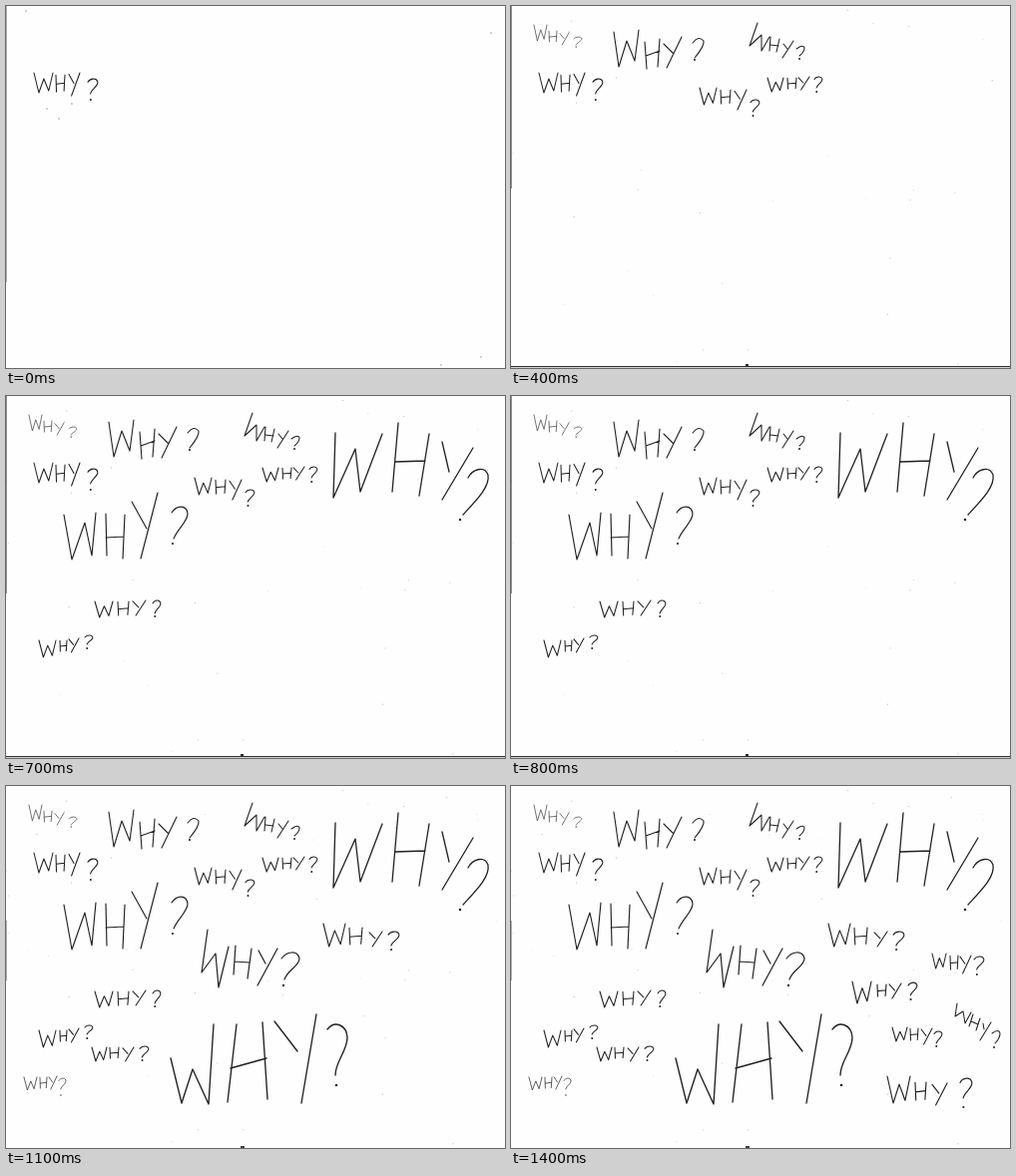
Write an HTML page that moves like this. It is 500 px wide and 363 px high and loops after 1.5 s.

```html
<!DOCTYPE html>
<html lang="en">
<head>
<meta charset="utf-8">
<title>Why?</title>
<style>
html, body { margin: 0; width: 100%; height: 100%; overflow: hidden; background: #fefefe; }
svg { display: block; width: 500px; height: 363px; }
path { fill: none; stroke: #202020; stroke-linecap: round; stroke-linejoin: round; }
</style>
</head>
<body>
<svg id="page" viewBox="0 0 500 363"></svg>
<script>
const STEP = 100, STEPS = 15;
const page = document.getElementById('page');
const parts = [];

// Letters in a unit box, stretched to the place they are written in
const GLYPHS = {
  W: 'M0,0 L.26,1 L.52,.3 L.78,.9 L1,0',
  H: 'M0,.02 L.06,1 M1,0 L.9,.96 M.03,.55 L.95,.48',
  Y: 'M0,.06 L.45,.46 M1,0 L.24,1',
  Q: 'M0,.22 C.2,-.02 .85,-.1 .98,.2 C1.08,.48 .35,.7 .26,1'
};

function add(tag, attrs, from, to = STEPS) {
  const el = document.createElementNS('http://www.w3.org/2000/svg', tag);
  for (const k in attrs) el.setAttribute(k, attrs[k]);
  page.appendChild(el);
  parts.push({ el, from, to });
}

function fit(glyph, [x, y, w, h]) {
  return GLYPHS[glyph].replace(/(-?[\d.]+),(-?[\d.]+)/g,
    (_, u, v) => (x + u * w).toFixed(1) + ',' + (y + v * h).toFixed(1));
}

function ink(from, d, dotX, dotY, width = 1.05, color = '#202020') {
  add('path', { d, style: `stroke:${color};stroke-width:${width}` }, from);
  add('circle', { cx: dotX, cy: dotY, r: width * 0.95, fill: color }, from);
}

// Boxes are [x, y, width, height]; the last number of q is the dot's y
function why(from, w, h, y, q, width, color) {
  const d = [fit('W', w), fit('H', h), fit('Y', y), fit('Q', q)].join(' ');
  ink(from, d, q[0] + q[2] * 0.28, q[4], width, color);
}

why(0, [28, 67, 19, 20], [50, 69, 9, 17], [63, 67, 11, 23], [82, 73, 10, 15, 94]);
why(1, [23, 19, 13, 16], [38, 25, 8, 11], [49, 27, 9, 12], [63, 31, 8, 8, 41], 0.8, '#505050');
ink(2, 'M103,26L108,61L116,35L124,55L128,24M134,36L136,63M149,33L147,61M135,50L149,45' +
  'M153,38L163,48M171,31L156,62M182,37Q188,29 193,35Q194,40 184,52', 184, 54, 1.1);
why(3, [189, 82, 17, 17], [210, 84, 10, 14], [224, 84, 12, 20], [240, 94, 9, 12, 110]);
why(3, [257, 72, 16, 14], [277, 72, 9, 11], [288, 71, 11, 13], [304, 71, 8, 11, 86]);

ink(4, 'M247,17L239,40L251,29L251,45L259,31M260,31L259,45M269,33L266,46M260,39L268,40' +
  'M273,38L277,43M283,35L272,52M286,43Q293,38 294,42Q294,46 289,50', 289, 53);
ink(5, 'M330,37L328,102L350,53L355,96L377,38M393,27L387,96M424,38L414,100M390,66L420,65' +
  'M437,46L444,76M468,52L437,104M463,82C467,74 479,69 483,79C485,91 472,104 458,119', 455, 124, 1.3);
ink(6, 'M58,119L66,164L79,127L86,160L90,117M100,118L101,160M119,119L117,163M100,142L118,141' +
  'M126,106L141,133M152,97L135,163M166,117C171,109 181,109 182,118C182,126 172,133 168,143', 167, 148, 1.15);
why(6, [33, 245, 17, 17], [54, 245, 7, 11], [63, 243, 10, 14], [79, 240, 8, 9, 253]);

why(7, [89, 206, 18, 16], [112, 206, 11, 14], [127, 205, 13, 15], [147, 205, 8, 13, 221]);
why(9, [18, 292, 13, 13], [34, 292, 7, 11], [43, 291, 8, 13], [53, 293, 7, 11, 310], 0.85, '#404040');
why(9, [86, 262, 15, 14], [104, 262, 9, 11], [117, 262, 11, 14], [134, 261, 9, 11, 275]);
ink(10, 'M165,273L176,318L187,284L203,319L208,239M231,239L222,317M257,237L262,314M225,283L261,273' +
  'M269,236L292,266M311,229L296,318M322,244C329,235 341,239 342,252C342,266 330,276 330,290', 331, 300, 1.35);

ink(11, 'M202,144L196,187L210,168L213,202L223,161M230,160L228,189M246,163L242,193M229,176L244,177' +
  'M253,165L260,178M272,163L252,200M276,173C281,166 292,164 294,173C294,181 282,184 279,194', 278, 200, 1.2);
why(11, [318, 138, 22, 23], [344, 142, 13, 17], [364, 146, 13, 15], [383, 146, 11, 14, 164], 1.1);
why(12, [342, 196, 19, 22], [367, 199, 9, 12], [379, 198, 12, 15], [398, 197, 9, 13, 214], 1.15);
why(12, [422, 168, 14, 15], [440, 170, 8, 14], [450, 170, 11, 18], [464, 171, 10, 13, 189]);

why(13, [377, 291, 23, 27], [405, 297, 11, 18], [422, 298, 15, 22], [450, 293, 12, 20, 322], 1.15);
why(13, [382, 242, 15, 14], [400, 243, 8, 12], [411, 243, 11, 16], [424, 246, 8, 12, 261]);
ink(14, 'M447,218L445,231L453,226L455,238L461,227M463,229L459,241M470,233L466,245M461,236L468,239' +
  'M473,238L474,244M481,237L470,255M482,248Q489,243 490,248Q490,253 485,258', 484, 262);

// Scan edges
function edge(x, y, w, h, color, from, to) {
  add('rect', { x, y, width: w, height: h, fill: color }, from, to);
}
edge(0, 0, 1, 277, '#b0b0b0', 0, 1);
edge(0, 0, 1, 165, '#909090', 1, 4);
edge(0, 0, 1, 183, '#909090', 4, 7);
edge(0, 0, 1, 198, '#909090', 7, 9);
edge(0, 135, 1, 60, '#b0b0b0', 9);
edge(0, 361, 500, 1.2, '#303030', 1, 9);
edge(235, 359, 3, 2, '#303030', 1, 9);
edge(235, 361, 4, 2, '#404040', 9);

// Dust on the paper
let seed = 17;
const rnd = () => (seed = (seed * 16807) % 2147483647) / 2147483647;
function dust(count, from, to) {
  for (let i = 0; i < count; i++) {
    const x = rnd() * 500, y = rnd() * 360, a = 0.12 + rnd() * 0.25;
    add('circle', { cx: x.toFixed(1), cy: y.toFixed(1), r: 0.6, fill: '#404040', opacity: a.toFixed(2) }, from, to);
  }
}
for (const [x, y] of [[20, 5], [486, 27], [41, 103], [53, 113], [66, 98], [436, 360], [476, 352]])
  add('circle', { cx: x, cy: y, r: 0.7, fill: '#808080' }, 0, 1);
dust(16, 1);
dust(16, 4);
dust(16, 9);

function draw(ms) {
  const step = Math.floor(ms / STEP) % STEPS;
  for (const p of parts)
    p.el.style.display = step >= p.from && step < p.to ? '' : 'none';
}

const start = performance.now();
function tick() {
  draw(performance.now() - start);
  requestAnimationFrame(tick);
}
draw(0);
requestAnimationFrame(tick);
</script>
</body>
</html>
```
